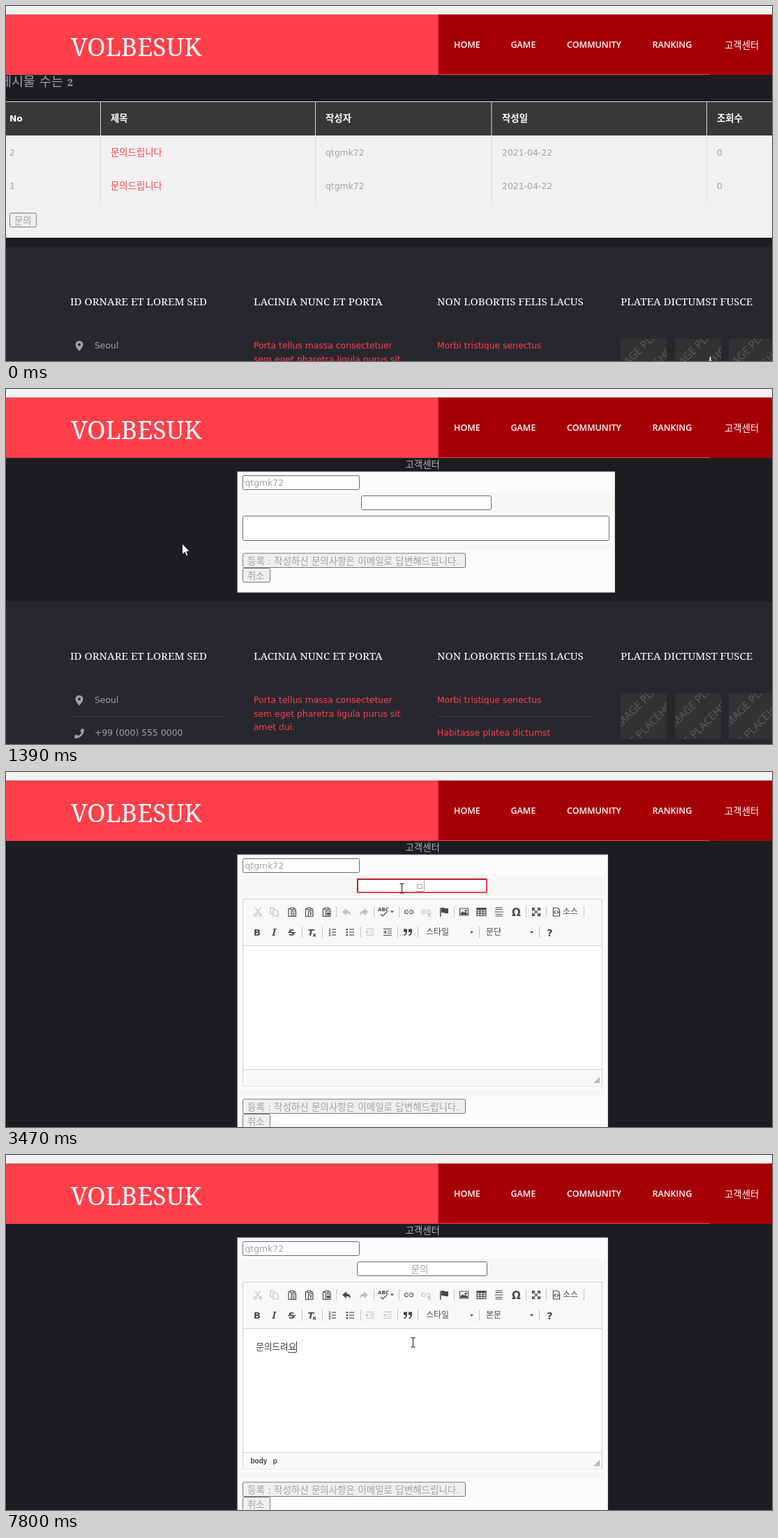
Recreate the animation shown at these times as an HTML page. Size 1098x510 px, loop 8000 ms.

```html
<!DOCTYPE html>
<html lang="ko">
<head>
<meta charset="utf-8">
<title>고객센터</title>
<style>
  html, body { margin: 0; width: 100%; height: 100%; overflow: hidden; background: #1c1d20; }
  svg { display: block; width: 1098px; height: 510px; }
  text { font-family: 'DejaVu Sans', 'Noto Sans CJK KR', 'Noto Sans CJK', sans-serif; white-space: pre; }
  .serif { font-family: 'Noto Serif', serif; }
  .sans { font-family: 'Open Sans', 'Noto Sans', 'Noto Sans CJK KR', sans-serif; }
  .ko { font-family: 'Noto Sans CJK KR', 'Noto Sans CJK', sans-serif; }
</style>
</head>
<body>
<svg id="stage" viewBox="0 0 1098 510" xmlns="http://www.w3.org/2000/svg"></svg>
<script>
const LATIN = 12.4, HANGUL = 13.4, BODY_HANGUL = 12.6;
const GRAY = '#a0a0a8', RED = '#ff404b', INK = '#484848', OFF = '#bebebe';
const RULE = '#d7d7d7', FIELD = '#6a6a6a';
const USER = 'qtgmk72';

const rect = (x, y, w, h, fill, more = '') =>
  `<rect x="${x}" y="${y}" width="${w}" height="${h}" fill="${fill}" ${more}/>`;
const box = (x, y, w, h, fill, stroke, r = 2) =>
  rect(x + .5, y + .5, w - 1, h - 1, fill, `stroke="${stroke}" rx="${r}"`);
const text = (x, y, str, fill = GRAY, size = LATIN, more = '') =>
  `<text x="${x}" y="${y}" fill="${fill}" font-size="${size}" ${more}>${str}</text>`;
const path = (d, fill, stroke = 'none', w = 1) =>
  `<path d="${d}" fill="${fill}" stroke="${stroke}" stroke-width="${w}"/>`;
const group = (id, inner, x = 0, y = 0) =>
  `<g id="${id}" transform="translate(${x} ${y})">${inner}</g>`;
const BOLD = 'font-weight="700"', MEDIUM = 'font-weight="500"';

function header() {
  const nav = [[642, 'HOME'], [723.5, 'GAME'], [804, 'COMMUNITY'], [926.5, 'RANKING']];
  return rect(0, 0, 1098, 12.5, '#f2f2f2') + rect(0, 12.5, 1098, 86.5, RED) +
    rect(619.5, 12.5, 478.5, 86.5, '#a60007') + rect(619.5, 98, 389, 1, RED) +
    text(93, 72, 'VOLBESUK', '#fff', 35.6, 'class="serif"') +
    nav.map(([x, s]) => text(x, 60, s, '#fff', 12.5, 'class="sans" font-weight="600"')).join('') +
    text(1030, 60.5, '고객센터', '#fff', HANGUL, 'class="ko" ' + MEDIUM);
}

function board() {
  const columns = [[5, 'No'], [150, '제목'], [458, '작성자'], [711, '작성일'], [1019, '조회수']];
  const dividers = [135, 443, 695.5, 1004];
  let s = text(-9, 115, '게시물', GRAY, 18.4, 'class="ko" font-weight="300"') +
    text(48, 115, '수는', GRAY, 18.4, 'class="ko" font-weight="300"') +
    text(88, 115, '2', GRAY, 14, 'class="serif" ' + BOLD) +
    rect(0, 137, 1098, 49, '#383838') + rect(0, 137, 1098, 1, RULE) +
    rect(0, 186, 1098, 147, '#f1f1f1') + rect(0, 332, 1098, 1, RULE);
  for (const x of dividers) s += rect(x, 138, 1, 144, RULE);
  columns.forEach(([x, label], i) => s += text(x, 166, label, '#fff', i ? HANGUL : LATIN, BOLD));
  [215, 263].forEach((y, i) => {
    s += text(5, y, 2 - i) + text(150, y, '문의드립니다', RED, HANGUL) +
      text(458, y, USER) + text(711, y, '2021-04-22') + text(1019, y, '0');
  });
  return s + '<rect id="ask" x="5.5" y="297.5" width="38" height="20" rx="2"/>' +
    text(12, 312.5, '문의', GRAY, HANGUL);
}

function thumbnail(x) {
  const line = (px, py, str) =>
    `<text class="sans" font-size="15.5" fill="#5c5c5c" transform="translate(${px} ${py}) rotate(-45)">${str}</text>`;
  return `<svg x="${x}" y="132" width="66" height="66">${rect(0, 0, 66, 66, '#323232')}` +
    line(-2, 52, 'IMAGE PLACEHOLDER') + line(19, 75, 'E PLACEHOLDER') + '</svg>';
}

function footer() {
  const titles = [[92, 'ID ORNARE ET LOREM SED'], [355, 'LACINIA NUNC ET PORTA'],
    [618, 'NON LOBORTIS FELIS LACUS'], [881, 'PLATEA DICTUMST FUSCE']];
  const porta = ['Porta tellus massa consectetuer', 'sem eget pharetra ligula purus sit', 'amet dui.'];
  return rect(0, 0, 1098, 260, '#27282d') +
    titles.map(([x, s]) => text(x, 84, s, '#fff', 15.1, 'class="serif" ' + MEDIUM)).join('') +
    path('M105 150C102 146 99.500 143 99.500 140.500a5.500 5.500 0 0 1 11 0C110.500 143 108 146 105 150zM105 138.500a2 2 0 1 0 .01 0z', GRAY) +
    path('M111.500 183.700l-2.900-.7-.8.4-1.300 3 .2.8 1.700 1.400c-1 2.100-2.700 3.800-4.900 4.900l-1.400-1.700-.8-.2-3 1.300-.3.800.7 2.800.6.5c7 0 12.700-5.700 12.700-12.700z', GRAY) +
    text(127, 146, 'Seoul') + text(127, 193, '+99 (000) 555 0000') +
    rect(92, 165, 220, 1, '#3d3e43') + rect(618, 165, 221, 1, '#3d3e43') +
    porta.map((s, i) => text(355, 146 + i * 19.5, s, RED)).join('') +
    text(618, 146, 'Morbi tristique senectus', RED) + text(618, 193, 'Habitasse platea dictumst', RED) +
    [881, 959, 1036].map(thumbnail).join('');
}

function formTop(width, height, inputX) {
  return box(331.5, 118.5, width, height, '#fcfcfc', RULE, 0) + rect(336, 149, width - 8, 30, '#f6f6f5') +
    box(339, 124, 168, 21, '#fff', FIELD) + text(342.5, 139, USER) +
    box(inputX, 153, 187, 21, '#fff', FIELD);
}

const formButtons = y =>
  box(339, y, 320, 21.5, '#efefef', '#767676') + box(339, y + 21.5, 40, 21, '#efefef', '#767676') +
  text(346, y + 16, '등록 : 작성하신 문의사항은 이메일로 답변해드립니다.', GRAY, 13.5) +
  text(346, y + 37, '취소', GRAY, HANGUL);

const plainForm = () => formTop(541.5, 174, 509) + box(339, 182, 526, 36, '#fff', FIELD) +
  rect(336, 222, 533, 9, '#f6f6f5') + formButtons(235.5);

const icon = (x, y, d, color = INK, filled = false, id = '') =>
  `<path ${id && `id="${id}"`} transform="translate(${x} ${y})" d="${d}" stroke-width="1.2" ` +
  `fill="${filled ? color : 'none'}" stroke="${filled ? 'none' : color}"/>`;
const glyph = (x, y, s, size, more = '') => text(x, y, s, INK, size, 'text-anchor="middle" ' + more);
const arrowDown = (x, y) => icon(x, y, 'M-2.500-1.500h5l-2.500 3z', INK, true);
const separators = (y, xs) => xs.map(x => rect(x, y - 8, 1, 16, '#c4c4c4')).join('');

function toolbar() {
  const a = 201, b = 230;
  const clip = 'M-2.500-4.500h-2.500v11h4M2.500-4.500h2.500v2M-2.500-6h5v2.500h-5zM-1-1.500h6.500v8h-6.500z';
  const bent = 'M-6 0L0-5v3C4-2 6 1 6 5C4 2 2 2 0 2v3z';
  const chain = 'M-1-2.500h-2.500a2.500 2.500 0 0 0 0 5h2.500M1-2.500h2.500a2.500 2.500 0 0 1 0 5h-2.500M-3 0h6';
  const dent = 'M-6-4.500h12M0-1.500h6M0 1.500h6M-6 4.500h12';
  let s = separators(a, [473, 527, 563, 642, 745, 774, 828]) +
    separators(b, [424, 453, 508, 561, 590, 678, 764]);
  s += icon(361, a, 'M-4-6L2.500 2.500M4-6L-2.500 2.500M-5.500 4.500a1.800 1.800 0 1 0 3.600 0a1.800 1.800 0 1 0-3.600 0M1.900 4.500a1.800 1.800 0 1 0 3.600 0a1.800 1.800 0 1 0-3.600 0', OFF) +
    icon(384, a, 'M-1 3h-4v-9h4l2 2M-1-3h4l3 3v6h-7z', OFF);
  [[410, 'M.5 1h3.500M.5 3h3.500M.5 5h3.500'], [434.5, 'M.5 1h3.500M2.300 1v4'], [459.5, 'M.5 1l1 3.500 1-3 1 3 1-3.500']]
    .forEach(([x, mark]) => s += icon(x, a, clip + mark));
  s += icon(488, a, bent, OFF, true, 'undo') + icon(513, a, 'M6 0L0-5v3C-4-2-6 1-6 5C-4 2-2 2 0 2v3z', OFF, true) +
    glyph(541, 200, 'ABC', 7, BOLD) + icon(541, a, 'M-4 3l3 3 6-6', INK) + arrowDown(553.5, a) +
    icon(577.5, a, chain) + icon(602, a, chain + 'M3 3l4 4M7 3l-4 4', OFF) +
    icon(628, a, 'M-6-6h1.500v13h-1.500zM-4-6h4l1 1h5v7h-5l-1-1h-4z', INK, true) +
    icon(656.5, a, 'M-6-5h12v10h-12z') + icon(656.5, a, 'M-5 4v-2l3-3 2 2 2-1 3 2v2zM1-3h3v2.500h-3z', INK, true) +
    icon(681.5, a, 'M-6.500-5.500h13v11h-13zM-6.500-1h13M-6.500 2.200h13M-2.200-4v9M2.200-4v9') + rect(675, 195, 13, 3, INK) +
    icon(706.5, a, 'M-5-6h10M-5-3.500h10M-6 0h12M-5 3.500h10M-5 6h10') +
    glyph(731.5, 206.5, 'Ω', 15, BOLD) +
    icon(760, a, 'M-6-6h5l-5 5zM6-6h-5l5 5zM-6 6h5l-5-5zM6 6h-5l5-5z', INK, true) +
    icon(760, a, 'M-5-5L5 5M5-5L-5 5') +
    icon(789, a, 'M-4.500-6h6l3 3v9h-9zM-1-1.500l-2 2 2 2M1-1.500l2 2-2 2') +
    text(798, 204.5, '소스', INK, 12, 'class="ko"');
  s += glyph(360, 235, 'B', 13, BOLD) +
    glyph(384, 235, 'I', 14, 'class="serif" font-style="italic" ' + BOLD) +
    glyph(409.5, 235, 'S', 13, BOLD) + rect(404, 230, 11, 1.2, INK) +
    glyph(437, 235, 'T', 13, 'font-style="italic" ' + BOLD) + icon(442, 234.5, 'M-2-2l4 4M2-2l-4 4');
  [-4, 0, 4].forEach((dy, i) => {
    s += glyph(464, b + dy + 2, i + 1, 5, BOLD) + rect(467, b + dy - .5, 6, 1.2, INK) +
      rect(487.5, b + dy - 1, 2.6, 2.6, INK, 'rx="1.300"') + rect(492, b + dy - .5, 7, 1.2, INK);
  });
  const quote = 'M-6 4c2-1 3-2 3-4h-3v-4.500h5v4c0 3-2 5-4 6zM1 4c2-1 3-2 3-4h-3v-4.500h5v4c0 3-2 5-4 6z';
  return s + icon(522, b, dent + 'M-2 0h-4M-4-2l-2 2 2 2', OFF) +
    icon(547, b, dent + 'M-6 0h4M-4-2l2 2-2 2', INK, false, 'indent') +
    icon(576, b, quote, INK, true) +
    text(602, 234, '스타일', INK, 12, 'class="ko"') + arrowDown(667.5, 230.5) +
    `<text id="format" class="ko" x="688" y="234" font-size="12" fill="${INK}"></text>` +
    arrowDown(753.5, 230.5) + glyph(779.5, 235.5, '?', 14.5, BOLD);
}

const editorForm = () => formTop(531.5, 410, 503) + rect(336, 456, 523, 9, '#f6f6f5') +
  box(339, 182, 516, 269.5, '#fff', '#d1d1d1', 0) +
  rect(340, 183, 514, 66, '#f8f8f8') + rect(340, 249, 514, 1, '#d1d1d1') +
  rect(340, 427, 514, 24, '#f8f8f8') + rect(340, 427, 514, 1, '#d1d1d1') +
  path('M851 438v9h-9z', '#b8b8b8') + toolbar() + formButtons(469.5) +
  `<g id="crumbs" font-weight="700">${[[350.5, 'body'], [382.5, 'p']].map(([x, s]) =>
    text(x, 443, s, INK, 10, `style="font-family:'Liberation Sans',sans-serif"`)).join('')}</g>` +
  group('focus', path('M503 174v-21h187l-2 2h-183v17z', '#b3202c') + path('M690 153v21h-187l2-2h183v-17z', '#e8434e')) +
  '<g id="subject"></g><g id="message"></g>';

function suggestions() {
  const items = ['aaaa', '45455', 'aa', 'aaa', 'bbb', 'cvcv'];
  return rect(503, 173.5, 214, 257.5, '#fff', 'rx="4" filter="url(#shadow)"') +
    items.map((s, i) => text(527, 207 + i * 39.8, s, '#222', 13.5,
      `style="font-family:'Noto Sans',sans-serif"`)).join('');
}

const pointers = {
  arrow: path('M0 0v16l3.700-3.500 2.400 5.500 2.500-1-2.400-5.400h5z', '#fff', '#111'),
  hand: path('M-1.500 1c0-2 3-2 3 0v4l5 1.500v7h-8l-4-6c0-1.500 2-1.500 4 .5z', '#fff', '#222'),
  beam: path('M-3-6.500h2.500l.5.5.5-.5h2.500M0-6v12.500M-3 7h2.500l.5-.5.5.5h2.500', 'none', '#111')
};

const stage = document.getElementById('stage');
stage.innerHTML =
  '<defs><filter id="shadow" x="-10%" y="-10%" width="120%" height="120%">' +
  '<feDropShadow dx="0" dy="1.500" stdDeviation="1.500" flood-opacity=".4"/></filter></defs>' +
  rect(0, 99, 1098, 411, '#1c1d20') + group('board', board()) +
  group('plain', plainForm()) + group('editor', editorForm()) +
  group('title', text(572.5, 113, '고객센터', '#b4b4b9', HANGUL, 'class="ko" ' + MEDIUM)) +
  group('footer', footer()) + header() + group('list', suggestions()) +
  Object.entries(pointers).map(([id, shape]) => group(id, shape)).join('');

const el = id => document.getElementById(id);
const show = (id, on) => el(id).setAttribute('display', on ? 'inline' : 'none');
const within = (t, from, to) => t >= from && t < to;

const HOVER = 680, FORM = 1230, EDITOR = 1455, FOCUS = 2090, LIST = 2315, TYPE = 3470;
const WRITE = 5480, TOOLS = 5635, UNDO = 6330;
// Jamo join the previous syllable as a final consonant until a vowel follows.
const subjectKeys = [[0, ''], [TYPE, 'ㅁ'], [4010, ''], [4320, 'ㅁ'], [4395, '무'], [4470, '문'],
  [4640, '문ㅇ'], [4715, '문으'], [4790, '문의']];
const messageKeys = [[0, ''], [6250, 'ㅁ'], [6330, '무'], [6410, '문'], [6640, '문ㅇ'], [6715, '문으'], [6790, '문의'],
  [7250, '문읟'], [7420, '문의드'], [7500, '문의들'], [7650, '문의드려'], [7725, '문의드령'], [7800, '문의드려요']];
const track = [[0, 1009, 504], [150, 960, 485], [300, 620, 390], [530, 120, 318], [680, 30, 299], [850, 30, 290],
  [1080, 29, 302], [1230, 52, 296], [1310, 145, 262], [1460, 367, 179], [1540, 425, 175], [1690, 454, 171],
  [1780, 454, 171], [1860, 520, 168], [2015, 567, 167], [5175, 567, 167], [5250, 569, 178], [5480, 583, 269],
  [8001, 583, 269]];

const latest = (keys, t) => keys.filter(k => k[0] <= t).pop()[1];

function pointerAt(t) {
  const tick = Math.max(0, Math.floor((t - 60) / 77.2) * 77.2 + 70);
  const i = track.findIndex(k => k[0] > tick);
  const [a, b] = [track[i - 1], track[i]];
  const p = (tick - a[0]) / (b[0] - a[0]);
  return [1, 2].map(k => a[k] + (b[k] - a[k]) * p);
}

// Text with an underlined last syllable while composing, and a caret.
function typed(str, x, y, size, color, underlineY, composing, caret) {
  const step = size * .92, end = x + str.length * step;
  return text(x, y, str, color, size, 'class="ko"') +
    (composing && str ? rect(end - step, underlineY, step, 1, color) : '') +
    (caret ? rect(Math.round(end - .5), underlineY - 15, 1, 15, color) : '');
}

function draw(t) {
  show('board', t < FORM);
  show('plain', within(t, FORM, EDITOR));
  show('editor', t >= EDITOR);
  show('title', t >= FORM);
  show('footer', t < EDITOR);
  el('footer').setAttribute('transform', `translate(0 ${t < FORM ? 346 : 305})`);
  show('focus', within(t, FOCUS, WRITE));
  show('list', within(t, LIST, TYPE));
  show('crumbs', t >= TOOLS);

  el('ask').setAttribute('fill', t >= HOVER ? '#e3e3e3' : '#efefef');
  el('ask').setAttribute('stroke', t >= HOVER ? '#4c4c4c' : '#77778f');
  el('undo').setAttribute('fill', t >= UNDO ? INK : OFF);
  el('indent').setAttribute('stroke', t >= TOOLS ? OFF : INK);
  el('format').textContent = t >= TOOLS ? '본문' : '문단';

  const subject = latest(subjectKeys, t);
  const subjectCaret = within(t, FOCUS, WRITE) && !within(t, 2630, 3090);
  el('subject').innerHTML = typed(subject, 593 - subject.length * HANGUL * .46, 168.5, HANGUL, GRAY, 171,
    t < WRITE, subjectCaret);
  el('message').innerHTML = typed(latest(messageKeys, t), 358.3, 280, BODY_HANGUL, '#3a3a3a', 283,
    true, t >= WRITE && !within(t, 6020, 6250));

  const [x, y] = pointerAt(t);
  const kind = t < 150 ? 'hand' : t < 1860 ? 'arrow' : 'beam';
  for (const id in pointers) show(id, id === kind);
  el(kind).setAttribute('transform', `translate(${Math.round(x) + .5} ${Math.round(y)})`);
}

const start = performance.now();
function loop(now) {
  draw(Math.max(0, now - start) % 8000);
  requestAnimationFrame(loop);
}
draw(0);
requestAnimationFrame(loop);
</script>
</body>
</html>
```
